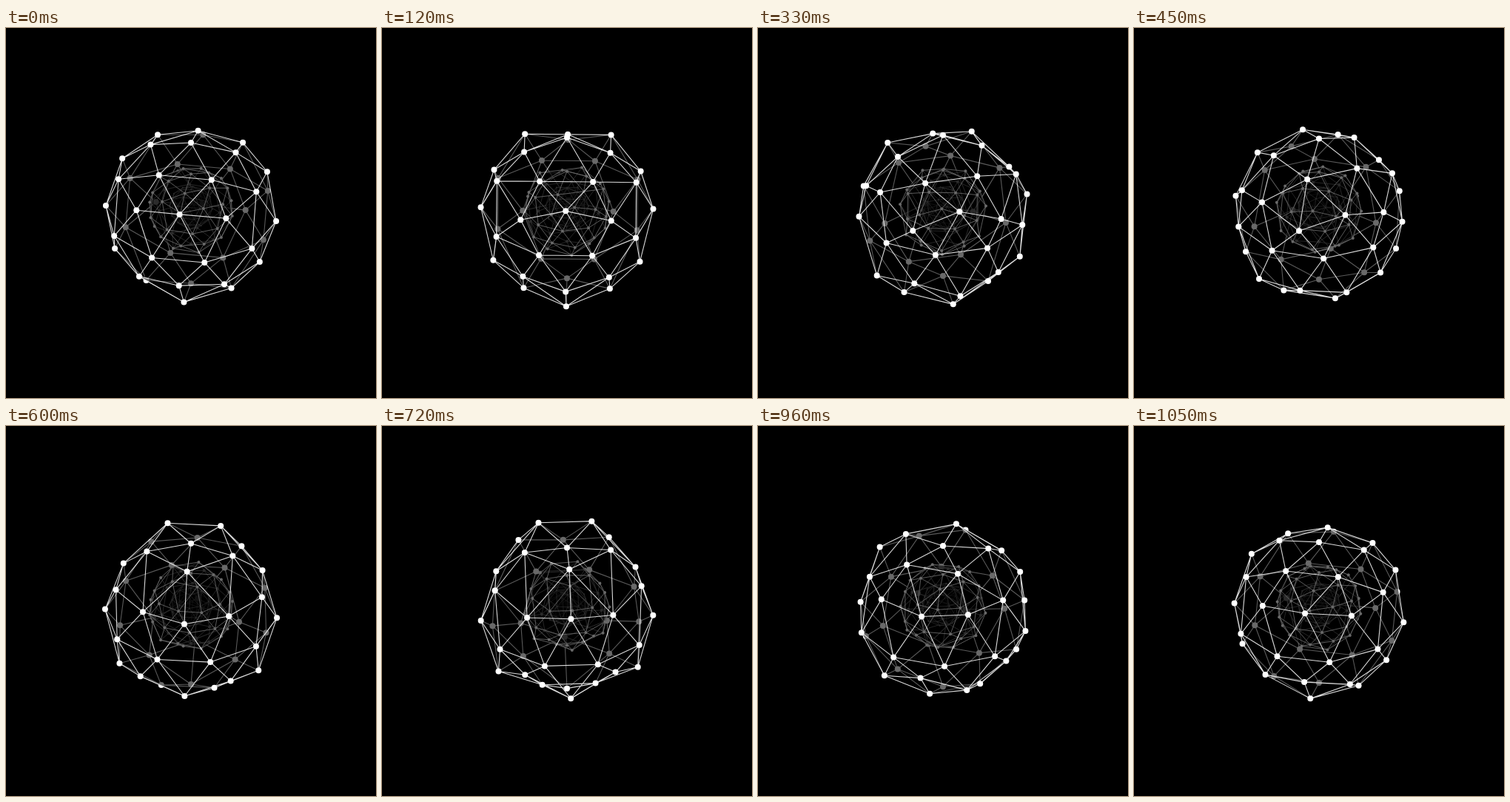
These frames come from a looping animation (500 by 500 pixels, 1080 ms). An HTML page with a canvas:

```html
<!DOCTYPE html>
<html lang="en">
<head>
<meta charset="utf-8">
<title>Nested wire spheres</title>
<style>
html, body { margin: 0; width: 100%; height: 100%; overflow: hidden; background: #000; }
canvas { display: block; width: 500px; height: 500px; }
</style>
</head>
<body>
<canvas id="stage" width="500" height="500"></canvas>
<script>
const ctx = document.getElementById('stage').getContext('2d');
const LOOP = 1080, STEP = 30, RAD = Math.PI / 180;
const TILT = 35.3 * RAD, COS = Math.cos(TILT), SIN = Math.sin(TILT);
const BOB = 0.094;
const VEIL = 'rgba(0,0,0,0.59)';
const LINE = 'rgba(255,255,255,0.85)';

// Rings of a subdivided icosahedron: height, count, azimuth, bob phase (degrees)
const RINGS = [
  [1, 1, 0, 180],
  [0.8507, 5, 36, 24],
  [0.5257, 5, 0, 206],
  [0.4472, 5, 36, -21],
  [0, 10, 18, 178],
  [-0.4472, 5, 0, -21],
  [-0.5257, 5, 36, 206],
  [-0.8507, 5, 0, 24],
  [-1, 1, 0, 180]
];

const nodes = RINGS.flatMap(([y, count, az, phase]) =>
  Array.from({ length: count }, (_, i) => ({
    y, r: Math.sqrt(1 - y * y), az: (az + i * 360 / count) * RAD, phase: phase * RAD
  })));

const rest = nodes.map(n => [n.r * Math.sin(n.az), -n.y, n.r * Math.cos(n.az)]);
const near = (i, j) => Math.hypot(...rest[i].map((v, k) => v - rest[j][k])) < 0.7;

// Positive when the corners run clockwise on screen, seen from outside
function winding(i, j, k) {
  const [a, b, c] = [rest[i], rest[j], rest[k]];
  return a[0] * (b[1] * c[2] - b[2] * c[1])
       + a[1] * (b[2] * c[0] - b[0] * c[2])
       + a[2] * (b[0] * c[1] - b[1] * c[0]);
}

const edges = [], faces = [];
for (let i = 0; i < nodes.length; i++) {
  for (let j = i + 1; j < nodes.length; j++) {
    if (!near(i, j)) continue;
    edges.push([i, j]);
    for (let k = j + 1; k < nodes.length; k++) {
      if (near(i, k) && near(j, k)) faces.push(winding(i, j, k) > 0 ? [i, j, k] : [i, k, j]);
    }
  }
}

// From the outermost inwards
const SPHERES = [
  { size: 116.5, cy: 250.1, start: -9, turn: 72, dot: 4, line: 1.1 },
  { size: 58, cy: 244.5, start: 20, turn: -72, dot: 2, line: 1 },
  { size: 29, cy: 242, start: -9, turn: 72, dot: 1, line: 0.8 }
];

function project(s, p) {
  const spin = (s.start + s.turn * p) * RAD;
  return nodes.map(n => {
    const depth = n.r * Math.cos(n.az + spin);
    const bob = BOB * Math.sin(2 * Math.PI * p + n.phase);
    return {
      x: 250 + s.size * n.r * Math.sin(n.az + spin),
      y: s.cy + s.size * (bob - n.y * COS + depth * SIN)
    };
  });
}

function facesUs(a, b, c) {
  return (b.x - a.x) * (c.y - a.y) - (b.y - a.y) * (c.x - a.x) > 0;
}

function drawWires(s, pts, lines, dots) {
  ctx.strokeStyle = LINE;
  ctx.lineWidth = s.line;
  ctx.beginPath();
  for (const [i, j] of lines) {
    ctx.moveTo(pts[i].x, pts[i].y);
    ctx.lineTo(pts[j].x, pts[j].y);
  }
  ctx.stroke();
  ctx.fillStyle = '#fff';
  for (const i of dots) {
    ctx.beginPath();
    ctx.arc(pts[i].x, pts[i].y, s.dot, 0, 2 * Math.PI);
    ctx.fill();
  }
}

function drawVeil(pts, front) {
  ctx.fillStyle = VEIL;
  ctx.beginPath();
  for (const face of front) {
    face.forEach((i, n) => n ? ctx.lineTo(pts[i].x, pts[i].y) : ctx.moveTo(pts[i].x, pts[i].y));
    ctx.closePath();
  }
  ctx.fill();
}

// Far wires, then whatever is inside, then the translucent near faces and their wires
function drawSphere(level, p) {
  const s = SPHERES[level];
  if (!s) return;
  const pts = project(s, p);
  const front = faces.filter(f => facesUs(...f.map(i => pts[i])));
  const dotSet = new Set(front.flat());
  const isFront = ([i, j]) => front.some(f => f.includes(i) && f.includes(j));
  const all = nodes.map((_, i) => i);

  drawWires(s, pts, edges.filter(e => !isFront(e)), all.filter(i => !dotSet.has(i)));
  drawSphere(level + 1, p);
  drawVeil(pts, front);
  drawWires(s, pts, edges.filter(isFront), dotSet);
}

function draw(now) {
  const t = Math.floor((now % LOOP) / STEP) * STEP;
  ctx.fillStyle = '#000';
  ctx.fillRect(0, 0, 500, 500);
  drawSphere(0, t / LOOP);
}

let begin;
function tick(now) {
  if (begin === undefined) begin = now;
  draw(now - begin);
  requestAnimationFrame(tick);
}
draw(0);
requestAnimationFrame(tick);
</script>
</body>
</html>
```
